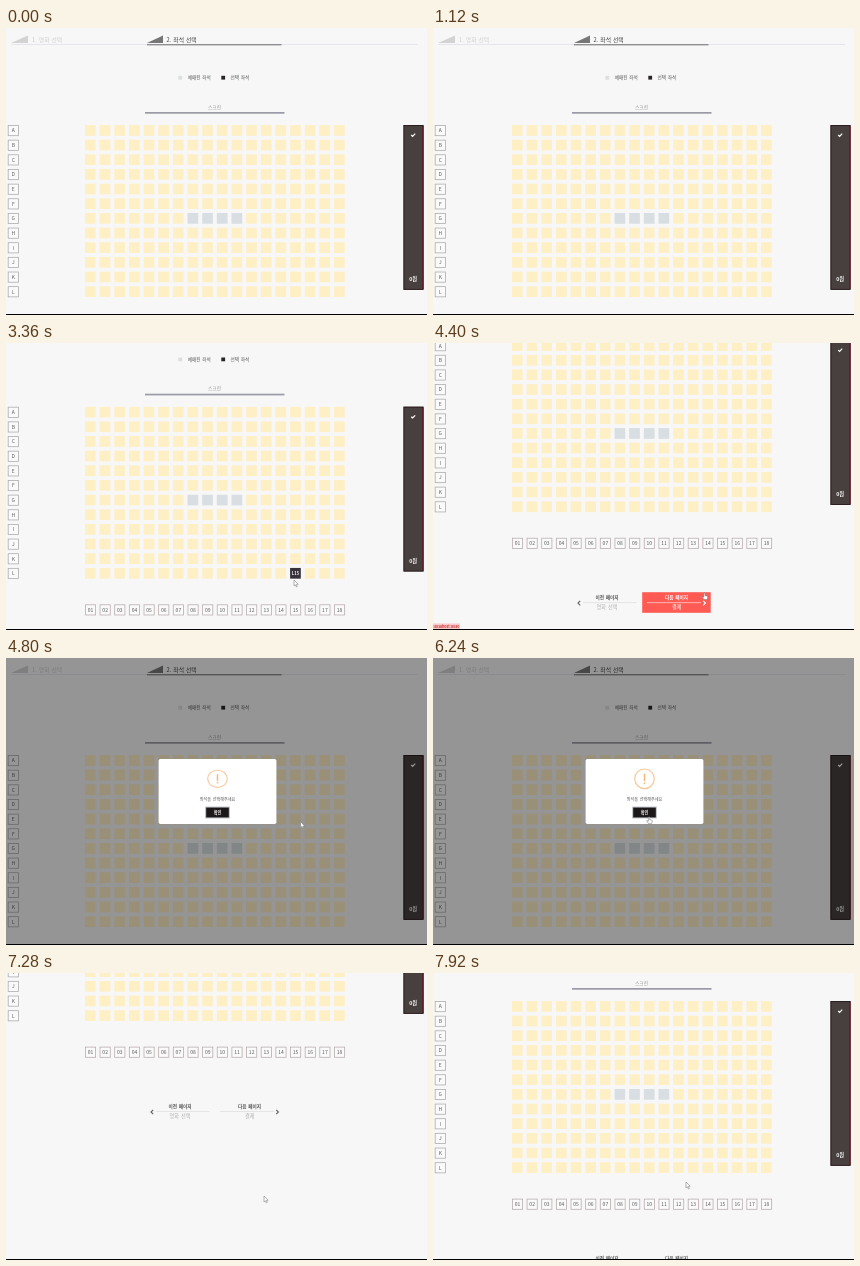
Recreate the animation shown at these times as an HTML page with a canvas. Size 421 by 287 pixels, loop 8000 ms.

```html
<!DOCTYPE html>
<html lang="ko">
<head>
<meta charset="utf-8">
<title>좌석 선택</title>
<style>
html, body { margin: 0; width: 100%; height: 100%; overflow: hidden; background: #f7f7f7; }
canvas { display: block; width: 421px; height: 287px; }
</style>
</head>
<body>
<canvas id="stage"></canvas>
<script>
const W = 421, H = 287, LOOP = 8000, STEP = 80;
const PITCH = 14.65, SEAT = 10.7, LEFT = 79, TOP = 97.1, COLS = 18, ROWS = 12;
const MOUSE_IN = 1760, OPEN = 4440, CLOSE = 6250, RISE = 7280;
const NOTCH = 33.3, BOTTOM = 221;
const FONT = '"Noto Sans CJK KR", "Noto Sans CJK", "Noto Sans", sans-serif';

const canvas = document.getElementById('stage');
const ctx = canvas.getContext('2d');
const ratio = window.devicePixelRatio || 1;
canvas.width = W * ratio;
canvas.height = H * ratio;

const moves = [
  { at: 1760, x: 238, y: 206 },
  { at: 2700, x: 287, y: 230 },
  { at: 3200, x: 288, y: 237, ms: 160 },
  { at: 3920, x: 271.5, y: 250 },
  { at: 4560, x: 312, y: 98 },
  { at: 5200, x: 216, y: 159, ms: 160 },
  { at: 6880, x: 258, y: 223, ms: 160 },
  { at: RISE, x: 253, y: 209, ms: 120 }
];

const clamp = v => Math.max(0, Math.min(1, v));
const ease = p => p * p * (3 - 2 * p);
const mix = (a, b, p) => a + (b - a) * p;
const glide = (t, at, ms) => ease(clamp((t - at) / ms));
const inside = (p, x, y, w, h) => p[0] >= x && p[0] < x + w && p[1] >= y && p[1] < y + h;
const modalOn = t => t > OPEN && t < CLOSE + 150;

function scrollAt(t) {
  if (t < OPEN) return NOTCH * [3060, 3560, 3780].reduce((sum, at) => sum + glide(t, at, 220), 0);
  if (t < RISE) return BOTTOM * glide(t, CLOSE + 130, 400);
  return BOTTOM - 152 * clamp((t - RISE) / 640);
}

function mouseAt(t) {
  let x = 412, y = 190;
  for (const m of moves) {
    const p = glide(t, m.at, m.ms || 440);
    x = mix(x, m.x, p);
    y = mix(y, m.y, p);
  }
  return [x, y];
}

function rect(x, y, w, h, color) {
  ctx.fillStyle = color;
  ctx.fillRect(x, y, w, h);
}

function frameRect(x, y, w, h, color, width) {
  ctx.strokeStyle = color;
  ctx.lineWidth = width;
  ctx.strokeRect(x + width / 2, y + width / 2, w - width, h - width);
}

function text(s, x, y, size, color, weight = 400, align = 'center') {
  ctx.font = `${weight} ${size}px ${FONT}`;
  ctx.wordSpacing = '0.7px';
  ctx.textAlign = align;
  ctx.fillStyle = color;
  ctx.fillText(s, x, y + size * 0.37);
}

function triangle(x, w, color) {
  ctx.beginPath();
  ctx.moveTo(x, 15);
  ctx.lineTo(x + w, 15);
  ctx.lineTo(x + w, 7.5);
  ctx.fillStyle = color;
  ctx.fill();
}

// two-armed line through (x, y), used for chevrons and the check mark
function bend(x, y, ax, ay, bx, by, color) {
  ctx.beginPath();
  ctx.moveTo(x + ax, y + ay);
  ctx.lineTo(x, y);
  ctx.lineTo(x + bx, y + by);
  ctx.strokeStyle = color;
  ctx.lineWidth = 1.2;
  ctx.stroke();
}

const chevron = (x, dir, color) => bend(x, 360, -2.2 * dir, -2.2, -2.2 * dir, 2.2, color);

function label(s, x, y, border) {
  rect(x, y, 11, 11, '#fafafa');
  frameRect(x, y, 11, 11, border, 0.8);
  text(s, x + 5.5, y + 5.5, 5, '#5c5c5c');
}

function header() {
  rect(5, 16, 407, 0.8, '#e2e2ec');
  rect(141, 16, 134.5, 1.4, '#8f8f92');
  triangle(5, 17, '#d3d3d3');
  triangle(141, 16, '#777');
  text('1. 영화 선택', 26, 12, 5.8, '#cfcfcf', 400, 'left');
  text('2. 좌석 선택', 160.5, 12, 5.8, '#444', 400, 'left');

  rect(172.3, 47.8, 3.8, 3.8, '#dcdfe0');
  text('예매된 좌석', 181.7, 49.7, 4.65, '#555', 400, 'left');
  rect(215.3, 47.8, 3.8, 3.8, '#2b2528');
  text('선택 좌석', 224.5, 49.7, 4.65, '#555', 400, 'left');

  text('스크린', 208.5, 79, 4.8, '#999');
  rect(139, 84, 139.5, 1.7, '#9a9ba6');
}

function seats(point) {
  for (let r = 0; r < ROWS; r++) {
    const y = TOP + r * PITCH, row = String.fromCharCode(65 + r);
    label(row, 1.8, y, '#adadad');
    for (let c = 0; c < COLS; c++) {
      const x = LEFT + c * PITCH;
      const taken = r === 6 && c >= 7 && c <= 10;
      const hot = !taken && point && inside(point, x, y, SEAT, SEAT);
      rect(x, y, SEAT, SEAT, hot ? '#35323a' : taken ? '#d8dee1' : '#ffefc5');
      if (hot) text(row + (c + 1), x + SEAT / 2, y + SEAT / 2, 4.1, '#fff', 700);
    }
  }
  for (let c = 0; c < COLS; c++) {
    label(String(c + 1).padStart(2, '0'), LEFT + c * PITCH, 294.7, '#b9adaf');
  }
}

function pricePanel() {
  rect(397.5, 97, 20, 164.8, '#483f3f');
  frameRect(397.5, 97, 20, 164.8, '#2a1a1c', 0.9);
  rect(416.6, 98, 0.9, 163, '#8a1519');
  bend(406.6, 108.3, -1.4, -1.3, 2.6, -2.7, '#fff');
  text('0원', 407.2, 251.2, 5.2, '#fff', 900);
}

function navigation(hot) {
  text('이전 페이지', 174, 354, 4.65, '#505050', 700);
  rect(150, 359.3, 53.5, 0.7, '#ddd');
  text('영화 선택', 174, 364.3, 5.2, '#b0b0b0');
  chevron(145, -1, '#666');

  if (hot) rect(209.2, 349.1, 68.5, 20.6, '#ff5b54');
  text('다음 페이지', 243.5, 354, 4.65, hot ? '#fff' : '#505050', 700);
  rect(214, 359.3, 54, 0.7, hot ? '#ffd9d6' : '#ddd');
  text('결제', 243.7, 364.3, 5.2, hot ? '#fff' : '#b0b0b0');
  chevron(272.4, 1, hot ? '#fff' : '#666');
}

function popScale(p) {
  if (p < 0.45) return mix(0.7, 1.05, p / 0.45);
  if (p < 0.8) return mix(1.05, 0.95, (p - 0.45) / 0.35);
  return mix(0.95, 1, (p - 0.8) / 0.2);
}

function warningIcon(tilt) {
  ctx.save();
  ctx.translate(211.5, 120.8);
  ctx.scale(1, Math.max(0.02, Math.cos(tilt)));
  ctx.strokeStyle = '#f8c89d';
  ctx.lineWidth = 1.2;
  ctx.beginPath();
  ctx.arc(0, 0, 9.8, 0, 7);
  ctx.stroke();
  rect(-0.75, -5.2, 1.5, 7.6, '#f6b77f');
  rect(-0.8, 3.7, 1.6, 1.6, '#f6b77f');
  ctx.restore();
}

function modal(t) {
  const out = clamp((t - CLOSE) / 150);
  const scale = out ? mix(1, 0.5, out) : popScale(clamp((t - OPEN) / 300));

  rect(0, 0, W, H, `rgba(0,0,0,${0.4 * clamp((t - OPEN) / 150) * (1 - out)})`);
  ctx.save();
  ctx.globalAlpha = 1 - out;
  ctx.translate(211.5, 133.5);
  ctx.scale(scale, scale);
  ctx.translate(-211.5, -133.5);

  ctx.beginPath();
  ctx.roundRect(152.6, 101, 117.8, 65, 1.8);
  ctx.fillStyle = '#fff';
  ctx.fill();

  warningIcon((1 - glide(t, OPEN, 560)) * Math.PI * 0.55);
  text('좌석을 선택해주세요', 211.5, 141, 4.1, '#545454');
  rect(199.2, 148.6, 24.6, 11.8, '#b4bac0');
  rect(200.2, 149.6, 22.6, 9.8, '#1c1718');
  text('확인', 211.5, 154.5, 4.2, '#fff', 700);
  ctx.restore();
}

const arrowShape = new Path2D('M0 0V6L1.4 4.8L2.4 6.9L3.3 6.5L2.4 4.4L4.2 4.3Z');
const handShape = new Path2D('M-.6 0H.6V2.6L3.2 3.2V5L2.5 6.6H-.6L-2.2 4V3.5L-.6 4.2Z');

function cursor([x, y], hand) {
  const shape = hand ? handShape : arrowShape;
  ctx.save();
  ctx.translate(x, y);
  ctx.fillStyle = '#fff';
  ctx.fill(shape);
  ctx.strokeStyle = '#777';
  ctx.lineWidth = 0.55;
  ctx.stroke(shape);
  ctx.restore();
}

function draw(t) {
  const mouse = mouseAt(t), blocked = modalOn(t), active = t >= MOUSE_IN;
  // hover trails the pointer by one step
  const past = Math.max(0, t - STEP);
  const [px, py] = mouseAt(past);
  const point = blocked || !active ? null : [px, py + scrollAt(past)];
  const navHot = !!point && inside(point, 209, 349, 69, 21);

  ctx.setTransform(ratio, 0, 0, ratio, 0, 0);
  rect(0, 0, W, H, '#f7f7f7');
  ctx.save();
  ctx.translate(0, -scrollAt(t));
  header();
  seats(point);
  pricePanel();
  navigation(navHot);
  ctx.restore();

  if (navHot) {
    rect(0, 280.5, 27, 5.5, '#fbcaca');
    text('localhost:8080', 0.5, 283.3, 3.6, '#c9383c', 700, 'left');
  }
  if (blocked) modal(t);
  if (active) cursor(mouse, navHot || (blocked && inside(mouse, 199, 148, 25, 13)));
  rect(0, 286, W, 1, '#000');
}

function frame(now) {
  draw(Math.floor((now % LOOP) / STEP) * STEP);
  requestAnimationFrame(frame);
}
requestAnimationFrame(frame);
</script>
</body>
</html>
```
